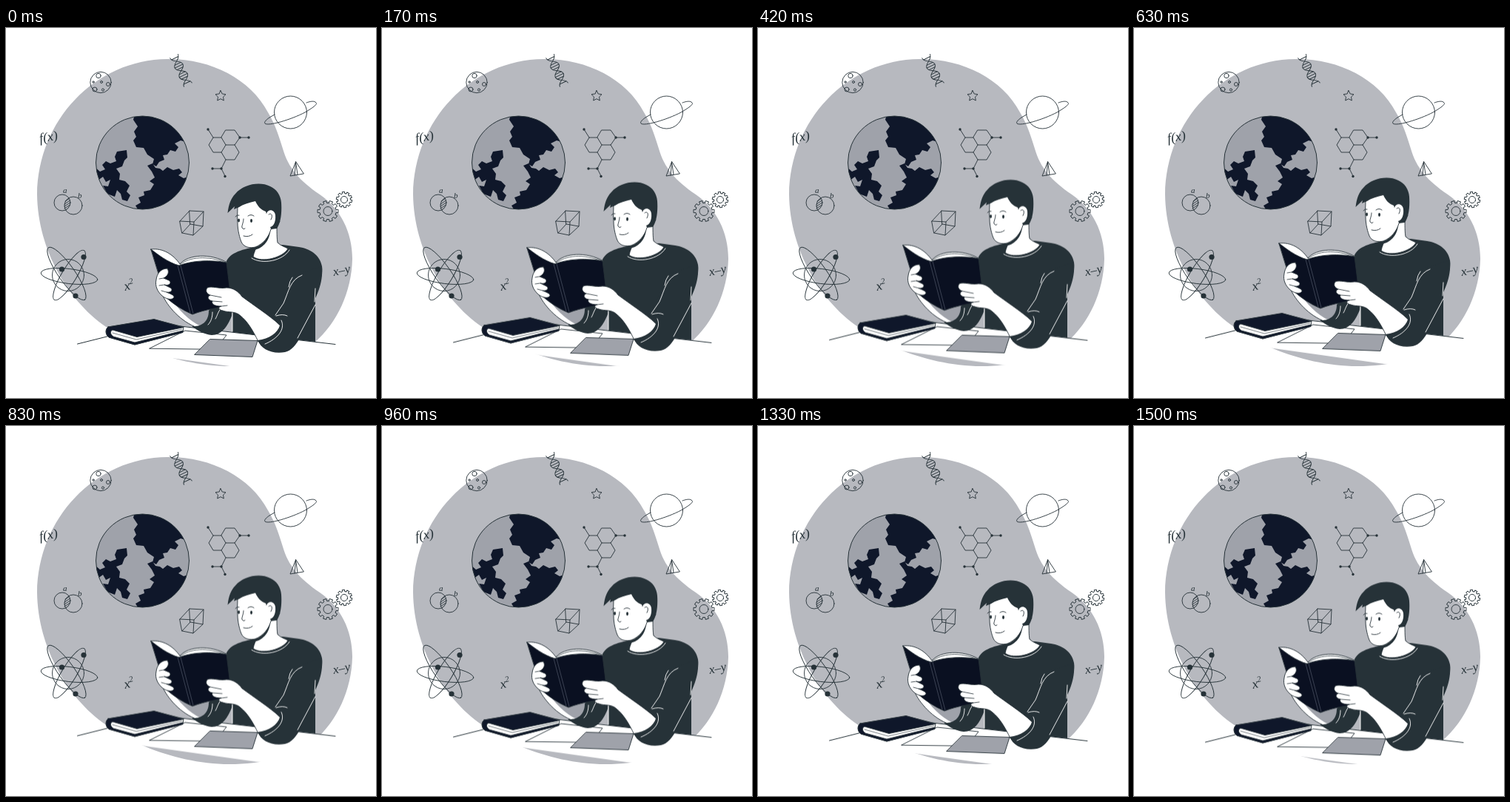
Recreate the animation shown at these times as an HTML page without scripts. Size 500 px wide and 500 px high, loop 1.54 s.

```html
<!DOCTYPE html>
<html lang="en">
<head>
<meta charset="utf-8">
<title>Reader floating among science icons</title>
<style>
html, body { margin: 0; width: 100%; height: 100%; overflow: hidden; background: #fff; }
svg { display: block; width: 100%; height: 100%; }
.ink, .line { stroke: #263238; stroke-linecap: round; stroke-linejoin: round; }
.ink { stroke-width: .9; }
.line { fill: none; }
.white { fill: #fff; }
.grey { fill: #9fa2aa; }
.navy { fill: #0f172a; }
.cover { fill: #0a1021; }
.dark { fill: #263238; }
.glow { fill: none; stroke: #fff; stroke-width: .9; stroke-linecap: round; }
text { font: italic 18px "Liberation Serif", serif; fill: #263238; }
.float { animation: float 1540ms linear -30ms infinite; }
@keyframes float {
  0%, 100% { transform: translateY(.4px); }
  50% { transform: translateY(-9.6px); }
}
</style>
</head>
<body>
<svg viewBox="0 0 500 500">
<defs>
  <clipPath id="disc"><circle cx="184.500" cy="182" r="63"/></clipPath>
  <clipPath id="lens"><circle cx="76" cy="236" r="11"/></clipPath>
  <path id="tooth" d="M10.500 -3.400 L11 -2 L14 -2.200 V2.200 L11 2 L10.500 3.400"/>
  <g id="pair"><use href="#tooth"/><use href="#tooth" transform="rotate(36)"/></g>
  <g id="gear">
    <use href="#pair"/><use href="#pair" transform="rotate(72)"/><use href="#pair" transform="rotate(144)"/>
    <use href="#pair" transform="rotate(216)"/><use href="#pair" transform="rotate(288)"/>
    <circle r="6"/>
  </g>
  <path id="strand" d="M-6 0 C-6 8 6 8 6 15 S-6 22 -6 29 S6 36 6 43"/>
</defs>

<path fill="#b7b9bf" d="M218 42 C275 41 330 68 354 114 C365 132 369 148 374 163 C381 188 396 206 424 225 C452 244 468 276 468 312 C467 356 448 398 417 425 C385 448 345 457 302 457 C262 457 222 447 190 434 C170 426 152 415 140 407 C85 372 43 300 42 225 C43 125 120 43 218 42Z"/>

<!-- Globe -->
<circle class="grey" cx="184.500" cy="182" r="63"/>
<g class="navy" clip-path="url(#disc)">
  <path d="M174 116 L172 124 L178 133 L173 140 L176 147 L172 152 L176 161 L186 162 L191 171 L200 177 L198 184 L203 187 L207 181 L214 178 L212 172 L218 171 L222 165 L229 167 L233 161 L228 156 L236 152 L243 154 L250 150 L225 112Z"/>
  <path d="M191 186 L198 183 L202 189 L208 190 L212 193 L218 188 L226 192 L234 190 L238 195 L233 199 L240 203 L250 200 L225 242 L180 248 L175 240 L182 236 L179 229 L187 226 L186 221 L195 219 L200 211 L194 207 L201 202 L197 194Z"/>
  <path d="M163 165 L150 167 L147 174 L149 180 L141 183 L135 180 L130 185 L134 191 L127 194 L118 186 L124 206 L131 201 L135 208 L141 205 L138 214 L131 213 L137 224 L147 228 L150 219 L155 224 L157 232 L164 234 L168 226 L163 221 L167 213 L161 207 L153 205 L154 197 L149 190 L157 187 L160 179 L164 175Z"/>
</g>
<circle class="line" cx="184.500" cy="182" r="63"/>

<!-- Icons -->
<g class="line" stroke-width=".9">
  <circle cx="128" cy="73.500" r="14.200"/>
  <circle cx="125" cy="64.500" r="3.200"/><circle cx="120" cy="83" r="3"/><circle cx="138" cy="76" r="2.500"/>
  <circle cx="129" cy="73" r="1.500"/><circle cx="118" cy="73" r="1.200"/><circle cx="131" cy="83.500" r="1.600"/>

  <g transform="translate(227 38) rotate(-26)">
    <use href="#strand"/><use href="#strand" transform="scale(-1 1)"/>
    <path d="M-5 3 H5 M-4.500 11.500 H4.500 M-6 15 H6 M-4.500 18.500 H4.500 M-4.500 25.500 H4.500 M-6 29 H6 M-4.500 32.500 H4.500 M-5 40 H5"/>
  </g>

  <path d="M290 84.500 L292.200 89 L297 89.700 L293.500 93.100 L294.300 98 L290 95.700 L285.700 98 L286.500 93.100 L283 89.700 L287.800 89Z"/>

  <circle cx="384.500" cy="114" r="22"/>
  <path d="M363 117 C353 122 348 127 350 129 C354 133 385 124 404 114 C416 107 421 103 419 101 C417 98 411 99 406 101"/>

  <path d="M297 138 H309 L316 148 L309 158 H297 L291 148Z M291 148 H280 L274 158 L280 168 H291 L297 158 M309 158 L315 168 L309 178 H297 L291 168 M280 148 L273 137 M316 148 H328 M297 178 L291 190 H279 M291 190 L296 200"/>

  <path d="M391.500 181 L384 200 L402 197Z L390 199 M391.500 181 L394 198"/>
  <path d="M235 261 L254 262 L253 280 L238 277Z M248 247 L267 248 L266 268 L249 265Z M235 261 L248 247 M254 262 L267 248 M253 280 L266 268 M238 277 L249 265"/>

  <circle cx="76" cy="236" r="11"/><circle cx="91" cy="240" r="12"/>
  <path clip-path="url(#lens)" d="M80 234 L88 229 M79 238 L88 232 M79 241 L88 235 M79 244 L88 238 M81 246 L88 241"/>

  <circle cx="84" cy="334" r="21.500"/>
  <ellipse cx="85.500" cy="335.500" rx="38.500" ry="10" transform="rotate(7 85.500 335.500)"/>
  <ellipse cx="82" cy="332" rx="43" ry="11" transform="rotate(55 82 332)"/>
  <ellipse cx="85.500" cy="334" rx="39" ry="10" transform="rotate(-59 85.500 334)"/>

  <use href="#gear" transform="translate(435 247.500)"/>
  <use href="#gear" stroke-width="1.200" transform="translate(457 232) rotate(12) scale(.76)"/>
</g>
<g class="dark">
  <circle cx="105" cy="309.500" r="3.600"/><circle cx="75.500" cy="326" r="3.600"/><circle cx="94" cy="362" r="3.600"/>
  <circle cx="273" cy="137" r="1.700"/><circle cx="316" cy="148" r="1.700"/><circle cx="328" cy="148" r="1.700"/>
  <circle cx="291" cy="190" r="1.700"/><circle cx="279" cy="190" r="1.700"/><circle cx="296" cy="200.500" r="1.700"/>
</g>
<text transform="translate(46 155) rotate(-10)">f(x)</text>
<text transform="translate(77 223)" style="font-size:11px">a</text>
<text transform="translate(97 230)" style="font-size:11px">b</text>
<text transform="translate(161 355) rotate(-14)">x<tspan dy="-7" style="font-size:11px">2</tspan></text>
<text transform="translate(443 335) rotate(-12)" style="font-size:17px">x–y</text>

<g class="float">
  <!-- Desk -->
  <path class="white" d="M96 427 L188 397 L445 427.500 L425 475 L345 463 L185 440.400Z"/>
  <path class="line" d="M96.500 427 L188 404 M188 397 L240 403.500 L445 427.500"/>
  <path class="ink white" d="M194 433 L242 409 L298 415 L283 434Z"/>
  <path class="ink grey" d="M276 420.500 L340 422.500 L333 444.500 L255 441.500Z"/>
  <path class="ink white" d="M138 404 L200 394 L240 404 L239 411 L174 428 L139 418 C134 414 134 407 138 404Z"/>
  <path class="ink navy" d="M138 404 L200 393.500 L240 404.500 L177 417.500 L144 408 C140 410 141 414 145 417 L174 425 L239 409 L239 411.500 L174 428 L139 418 C134 414 134 407 138 404Z"/>
  <path class="line" stroke-width=".6" d="M144 412 L176 421 L238 407"/>

  <!-- Torso and neck -->
  <path class="dark" d="M337 296 C318 299 299 305 297 319 C296 340 301 362 306 375 L306 411 L418 424 L418 352 C426 342 428 332 427 322 C424 306 410 298 396 296 L374 293Z"/>
  <path class="ink white" d="M340 292 L357 270 L366 258 C366 275 366 285 367 290 C371 294 377 296 381 298 C375 310 346 318 334 309 C335 303 338 298 340 292Z"/>
  <path class="dark" d="M332 297 C344 296 353 286 357 273 C357 288 345 300 333 300Z"/>
  <path class="glow" d="M332 311 C346 320 374 315 383 300"/>

  <!-- Head -->
  <path class="ink white" d="M313 243 C313 250 312 257 313 263 C313 274 316 284 318 289 C321 296 329 298 337 296 C347 292 355 283 358 272 L370 262 L362 235 L335 227Z"/>
  <path class="dark" d="M299.500 250 C301 238 304 230 310 224 C321 211 343 207 357 214 C366 218 371 226 372 236 C373 251 371 264 366 271 L358 272 L351 248 C345 246 340 241 337 234 C329 236 321 238 315 242 L308 245 L309 241Z"/>
  <path class="white" d="M352 251 C354 244 363 245 364 253 C365 262 361 270 355 269 L350 265Z"/>
  <path class="line" stroke-width=".9" d="M355 252 C359 249 361 254 358 259 M321 258 C321 263 318 268 319 270 Q321 273 323 271 M321 281 Q328 283 333 279 M310 255 Q312 252 315 253 M327 254 Q331 251 335 254"/>
  <g class="dark"><ellipse cx="314.500" cy="260" rx="1.500" ry="2.400"/><ellipse cx="331.500" cy="260.500" rx="1.500" ry="2.400"/></g>

  <!-- Far arm -->
  <path class="ink white" d="M211 360 C218 376 236 397 259 405 L272 401 L278 382 L232 357Z"/>
  <path class="grey" d="M223 365 L276 380 C276 392 271 400 263 403 C247 395 233 381 223 365Z"/>
  <path class="dark" d="M300 352 C307 365 306 378 305 389 C300 402 292 415 278 415 C268 414 259 409 251 403 C263 404 274 398 274 382Z"/>
  <path class="glow" d="M306 377 L306 410 M291 378 C286 384 286 388 283 393 M279 384 C279 391 277 397 273 401"/>

  <!-- Open book -->
  <path class="ink white" d="M196 299 C212 297 226 306 235 319 C246 306 276 304 299 317 L250 380Z"/>
  <path class="line" stroke-width=".7" d="M235 320 C248 309 272 307 297 317"/>
  <path class="ink cover" d="M196 299 C205 306 219 317 234 321 C251 314 278 313 298 317 L305 374 C288 378 270 380 252 387 C238 381 226 373 216 364Z"/>
  <path fill="none" stroke="#52596a" stroke-width=".7" d="M232 321 L249 385 M236 321 L253 386"/>

  <!-- Far hand -->
  <path class="ink white" d="M218 325 C209 325 204 332 203 340 C201 349 205 356 210 361 C216 367 225 368 227 364 C228 361 221 359 217 357 C224 358 226 353 222 351 L214 347 C222 349 224 343 220 341 L213 338 C217 336 222 331 218 325Z"/>
  <path class="line" stroke-width=".8" d="M213 338 L207 339 M214 347 L207 348 M217 357 L210 355"/>

  <!-- Near arm -->
  <path class="ink white" d="M272 351 C278 348 288 353 298 351 C307 351 314 356 319 363 C335 375 354 387 371 402 L370 415 L341 424 C334 409 326 396 317 389 C310 382 301 385 293 382 C287 381 286 377 291 376 C282 376 277 373 279 369 C273 368 271 363 276 361 C271 359 269 355 272 351Z"/>
  <path class="line" stroke-width=".8" d="M276 361 L291 364 M279 369 L292 370 M291 376 L299 375"/>
  <path class="dark" d="M427 322 C429 346 419 364 410 381 C404 405 395 434 377 438 C359 441 345 434 340 422 C356 420 367 412 370 402 L359 391 C371 372 380 354 384 336Z"/>
  <path class="glow" d="M400 334 C384 340 382 356 375 372 L364 388 M372 395 C378 407 367 420 350 427 M365 389 Q374 386 380 389 M387 337 Q383 342 382 350 M418 352 L417 370"/>
  <path class="glow" d="M418 374 L394 419" stroke-width=".7"/>
</g>
</svg>
</body>
</html>
```
